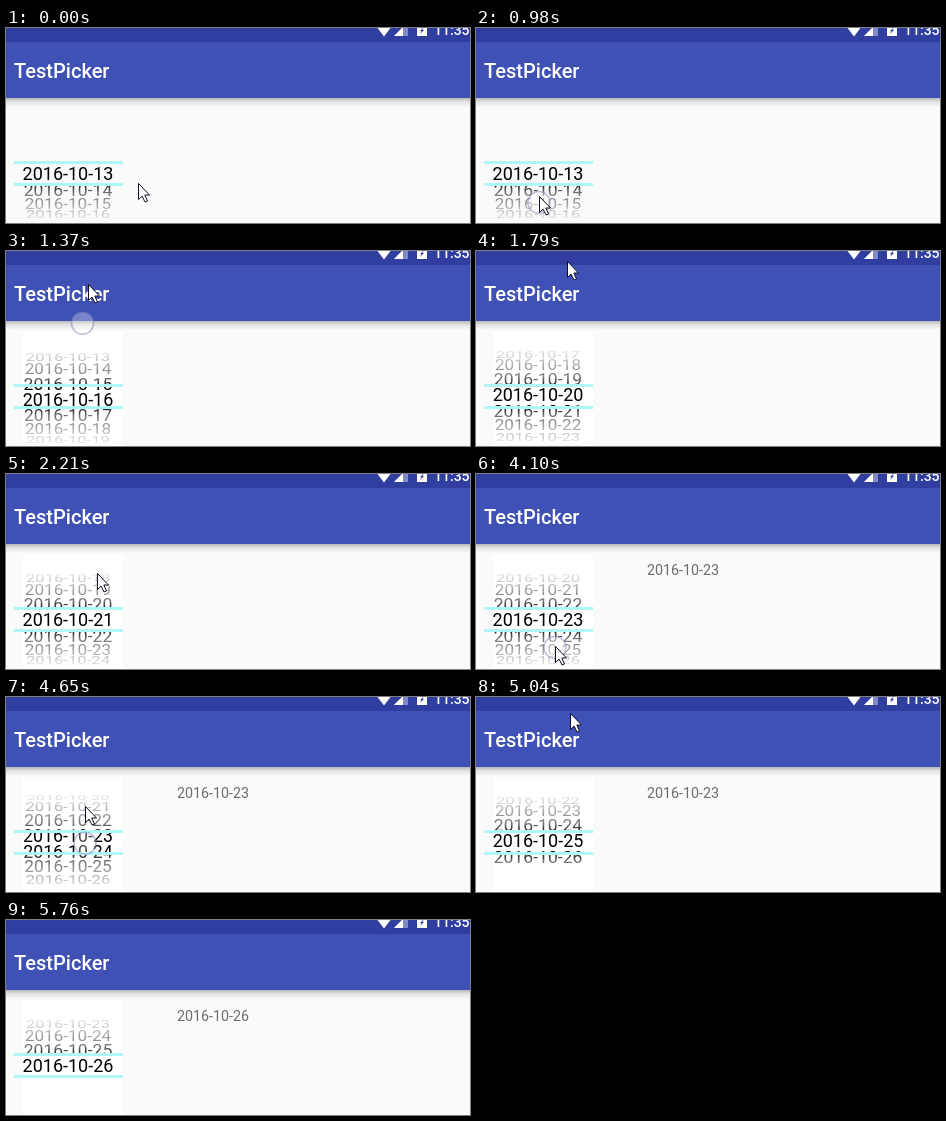
Write an HTML page with a canvas that moves like this. It is 464x195 px and loops after 6.91 s.

```html
<!DOCTYPE html>
<html>
<head>
<meta charset="utf-8">
<style>
html, body { margin: 0; width: 100%; height: 100%; overflow: hidden; background: #fafafa; }
canvas { display: block; }
</style>
</head>
<body>
<canvas id="stage" width="464" height="195"></canvas>
<script>
const ctx = document.getElementById('stage').getContext('2d');
const LOOP = 6910;
const TICK = 5760 / 42; // the screen refreshes at this pace
const FONT = 'Roboto, sans-serif';
const MID = 145.6;

// Each swipe turns the wheel by some days; the label follows later.
const swipes = [
  { press: 950, start: 950, dur: 1050, days: 8, report: 2460 },
  { press: 2870, start: 3020, dur: 400, days: 2, report: 3690 },
  { press: 3960, start: 4490, dur: 700, days: 3, report: 5340 }
];

// time, x, y of the pointer tip at its turning points
const pointer = [
  [0, 132, 155], [690, 63, 183], [980, 63, 167], [1490, 88, -8], [1700, 91, -8],
  [2470, 91, 158], [2880, 85, 180], [3020, 106, -18], [3340, 106, -18], [3950, 79, 174],
  [4480, 79, 168], [4660, 79, 110], [5060, 100, -25], [5211, 100, -25], [5760, 478, 250]
];

const clamp = v => Math.min(1, Math.max(0, v));
const smooth = v => v * v * (3 - 2 * v);
const date = day => '2016-10-' + (13 + day);
const wheelAt = t => swipes.reduce((p, s) => p + s.days * smooth(clamp((t - s.start) / s.dur)), 0);
const labelAt = t => swipes.reduce((p, s) => p + (t >= s.report ? s.days : 0), 0);

function pointerAt(t) {
  const i = Math.max(1, pointer.findIndex(k => k[0] >= t));
  const [t0, x0, y0] = pointer[i - 1], [t1, x1, y1] = pointer[i];
  const f = (t - t0) / (t1 - t0);
  return [x0 + (x1 - x0) * f, y0 + (y1 - y0) * f];
}

function rect(color, x, y, w, h) {
  ctx.fillStyle = color;
  ctx.fillRect(x, y, w, h);
}

function text(str, x, y, font, color) {
  ctx.font = font + ' ' + FONT;
  ctx.fillStyle = color;
  ctx.fillText(str, x, y);
}

function poly(color, ...pts) {
  ctx.beginPath();
  for (let i = 0; i < pts.length; i += 2) ctx.lineTo(pts[i], pts[i + 1]);
  ctx.closePath();
  ctx.fillStyle = color;
  ctx.fill();
}

function drawBars() {
  rect('#303f9f', 0, 0, 464, 14);
  rect('#3f51b5', 0, 14, 464, 56);
  const shade = ctx.createLinearGradient(0, 70, 0, 79);
  shade.addColorStop(0, 'rgba(0,0,0,.27)');
  shade.addColorStop(.4, 'rgba(0,0,0,.1)');
  shade.addColorStop(1, 'rgba(0,0,0,0)');
  rect(shade, 0, 70, 464, 9);
  text('TestPicker', 8, 50, '500 20px', '#fff');

  poly('#fff', 370, -2, 386, -2, 378, 8.5);
  poly('rgba(255,255,255,.4)', 388, 8, 402, 8, 402, -6);
  poly('#fff', 388, 8, 397, 8, 397, -1);
  rect('#fff', 411, -4, 10, 12);
  poly('#303f9f', 418, -1, 414, 3, 415.5, 3, 414, 6, 418, 2, 416.5, 2);
  text('11:35', 428, 7, '500 14px', '#fff');
}

// Dates sink into the background away from the middle of the wheel.
function fadeWheel(rgb) {
  for (const dir of [-1, 1]) {
    const fade = ctx.createLinearGradient(0, MID, 0, MID + dir * 57);
    fade.addColorStop(.16, `rgba(${rgb},0)`);
    fade.addColorStop(.33, `rgba(${rgb},.45)`);
    fade.addColorStop(.74, `rgba(${rgb},.85)`);
    fade.addColorStop(1, `rgba(${rgb},1)`);
    rect(fade, 17, MID, 90, dir * 57);
  }
}

function drawWheel(t) {
  const pos = wheelAt(t), turned = t >= 1230;
  if (turned) rect('#fff', 17, 80, 100, 115);

  ctx.textAlign = 'center';
  for (let day = 0; day < 14; day++) {
    const d = day - pos, angle = d * 18.5 * Math.PI / 180;
    if (Math.abs(d) > 3.8) continue;
    ctx.save();
    ctx.translate(62, MID + 50 * Math.sin(angle));
    ctx.scale(1 - .025 * Math.abs(d), Math.cos(angle));
    text(date(day), 0, 6.4, '18px', '#000');
    ctx.restore();
  }
  ctx.textAlign = 'left';
  fadeWheel(turned ? '255,255,255' : '250,250,250');
  for (const y of [133, 155]) rect('#aff8f6', 8, y, 109, 3);
}

function drawTouch(t) {
  if (!swipes.some(s => t >= s.press && t < s.start + s.dur * .6)) return;
  const [x, y] = pointerAt(t - 115); // the touch lags behind the pointer
  ctx.beginPath();
  ctx.arc(x, y, 11, 0, 7);
  ctx.fillStyle = 'rgba(255,255,255,.3)';
  ctx.fill();
  ctx.strokeStyle = 'rgba(110,120,180,.45)';
  ctx.lineWidth = 1.5;
  ctx.stroke();
}

function drawPointer(t) {
  const [x, y] = pointerAt(t);
  ctx.save();
  ctx.translate(Math.round(x) + .5, Math.round(y) + .5);
  poly('#fff', 0, 0, 0, 16, 3.6, 12.6, 6.5, 18.5, 9, 17.5, 6.3, 11.5, 11, 11.5);
  ctx.strokeStyle = '#101020';
  ctx.lineWidth = 1;
  ctx.stroke();
  ctx.restore();
}

function draw(now) {
  const t = Math.min(5760, Math.floor((now % LOOP + 15) / TICK) * TICK);
  const label = labelAt(t);
  rect('#fafafa', 0, 0, 464, 195);
  drawBars();
  drawWheel(t);
  if (label) text(date(label), 171, 101, '14.25px', '#6c6c6c');
  drawTouch(t);
  drawPointer(t);
}

const start = performance.now();
function loop() {
  draw(performance.now() - start);
  requestAnimationFrame(loop);
}
loop();
</script>
</body>
</html>
```
